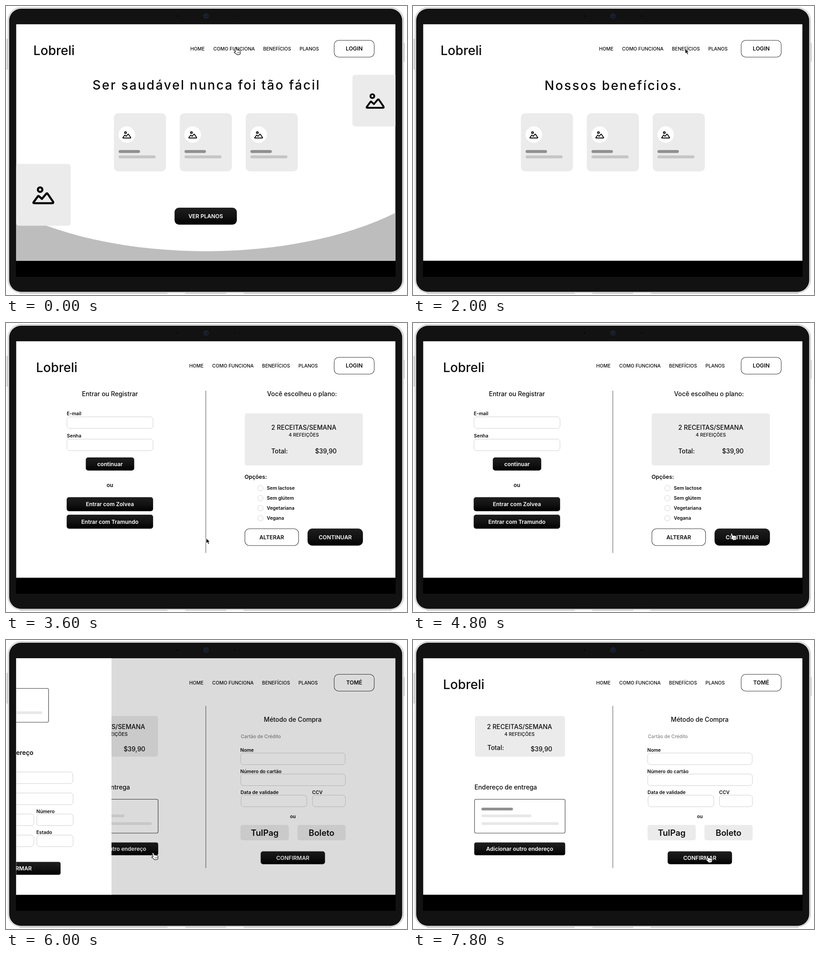
An HTML page that plays this animation: 881 by 636 pixels, repeating every 8000 ms.

```html
<!DOCTYPE html>
<html lang="pt">
<head>
<meta charset="utf-8">
<title>Protótipo</title>
<style>
html, body { margin: 0; width: 100%; height: 100%; overflow: hidden; background: #fff; }
svg { display: block; width: 100%; height: 100%; }
text { font-family: Inter, "Open Sans", sans-serif; font-optical-sizing: none; fill: #0c0c0c; white-space: pre; }
</style>
</head>
<body>
<svg id="stage" viewBox="0 0 881 636" xmlns="http://www.w3.org/2000/svg"></svg>
<script>
const LOOP = 8000, STEP = 200;
const PALE = '#ebebeb', DARK = '#909090', MID = '#c5c5c5';

const rect = (x, y, w, h, r, fill, extra = '') =>
  `<rect x="${x}" y="${y}" width="${w}" height="${h}" rx="${r}" fill="${fill}" ${extra}/>`;
const text = (x, y, s, size, weight = 500, anchor = 'start', extra = '') =>
  `<text x="${x}" y="${y}" font-size="${size}" font-weight="${weight}" text-anchor="${anchor}" ${extra}>${s}</text>`;
const mid = (x, y, s, size, weight = 500, extra) => text(x, y, s, size, weight, 'middle', extra);
const label = (x, y, s) => text(x, y, s, 10.4, 600);
const title = (y, s) => mid(440.5, y, s, 28, 500, 'letter-spacing="2.6"');
const bar = (x, y, w, h, fill) => rect(x, y, w, h, h / 2, fill);
const field = (x, y, w) => rect(x, y, w, 25.5, 6, 'none', 'stroke="#cfcfcf"');
const outline = (x, y, w, h, r) => rect(x, y, w, h, r, 'none', 'stroke="#3a3a3a" stroke-width="1.1"');
const button = (x, y, w, h, r, s, size = 12) =>
  rect(x, y, w, h, r, 'url(#ink)', 'stroke="#000" stroke-opacity=".3"') +
  mid(x + w / 2, y + h / 2 + 4.4, s, size, 600, 'style="fill:#fff"');
const divider = (y, h) => rect(438.5, y, 1, h, 0, '#4a4a4a');
const repeat = (n, make) => Array.from({ length: n }, (_, i) => make(i)).join('');

const icon = (x, y, k) => `<g transform="translate(${x} ${y}) scale(${k})" fill="none" stroke="#000"
  stroke-width="5.2" stroke-linejoin="round"><circle cx="-8" cy="-14" r="5.6"/>
  <path d="M-24 17 L-13.5 2.5 Q-12.3 1 -11 2.3 L-3.5 9 L7.5 -4 Q9 -5.6 10.5 -4 L24.2 16 Q26 19.8 22.5 19.8 H-22.5 Q-26 19.8 -24 17Z"/></g>`;

const miniCard = (x, y, k) => `<g transform="translate(${x} ${y}) scale(${k})">` +
  rect(0, 0, 114.5, 128, 9.5, PALE) + '<circle cx="28.4" cy="47" r="18.2" fill="#fff"/>' +
  icon(28.4, 47.6, 0.35) + bar(10.4, 81, 47, 6.6, DARK) + bar(10.4, 92.7, 81.3, 6.6, MID) + '</g>';
const miniRow = () => repeat(3, i => miniCard(237 + i * 144.8, 236, 1));

const header = (logoX, navX, user = 'LOGIN') =>
  text(logoX, 108, 'Lobreli', 28) +
  [['HOME', 0], ['COMO FUNCIONA', 50.5], ['BENEFÍCIOS', 160], ['PLANOS', 240]]
    .map(([s, dx]) => text(navX + dx, 98, s, 10.4)).join('') +
  outline(721, 75.5, 88, 37, 10) + mid(765, 98.4, user, 12, 600);

const summary = (cx, y) => mid(cx, y, '2 RECEITAS/SEMANA', 13.8) + mid(cx, y + 14.5, '4 REFEIÇÕES', 10.4);

const address = (x, y) => outline(x, y, 199, 74.5, 3.5) +
  bar(x + 15, y + 18.5, 69.5, 6, DARK) + bar(x + 15, y + 33.5, 110, 6, '#e8e8e8') +
  bar(x + 15, y + 50.5, 170, 6, '#e8e8e8');

const pages = {
  home: header(60, 405) +
    '<path d="M22 455 A570 266 0 0 0 856 455 V561 H22Z" fill="#bdbdbd"/>' +
    rect(22, 347.5, 120, 136, 6, PALE) + icon(82, 416.5, 0.88) +
    rect(761, 151.5, 110, 113.5, 6, PALE) + icon(811, 209, 0.76) +
    title(184, 'Ser saudável nunca foi tão fácil') + miniRow() +
    button(370.5, 444, 136.5, 37, 9.5, 'VER PLANOS'),

  how: header(60.4, 411.2) + title(186, 'Torne-se um chefe de primeira.') +
    repeat(3, i => rect(113.3 + i * 231, 237, 189.5, 184, 9, PALE) + icon(208 + i * 231, 330, 1)) +
    [117.5, 347, 580].map(x => bar(x, 436, 97.7, 13.6, DARK) + bar(x, 460.7, 169.7, 13.6, MID)).join(''),

  benefits: header(60.4, 408.8) + title(185, 'Nossos benefícios.') + miniRow(),

  plans: header(60.4, 406.1) + rect(12, 138, 122.5, 136, 6, PALE) + icon(74.5, 207.2, 0.88) +
    title(185, 'Conheça nossos planos.') +
    repeat(4, i => miniCard(122 + i * 167, 258.7, 1.157)) +
    button(370.5, 462, 136.5, 37, 9.5, 'CONFIRMAR'),

  sign: header(66, 402.6) + divider(149, 357) +
    mid(228.3, 161, 'Entrar ou Registrar', 13.8) +
    label(133.5, 203, 'E-mail') + field(134, 206.5, 189) +
    label(133.8, 252, 'Senha') + field(134, 255.5, 189) +
    button(175.5, 296, 106, 28.5, 5, 'continuar', 12.2) + mid(228.3, 361, 'ou', 12, 600) +
    button(133.5, 383.5, 189.5, 30.5, 5, 'Entrar com Zolvea') +
    button(133.5, 422, 189.5, 30.5, 5, 'Entrar com Tramundo') +
    mid(650.3, 161, 'Você escolheu o plano:', 13.8) +
    rect(524.5, 198.7, 259.5, 114.8, 5, PALE) + summary(654.3, 235) +
    text(582.7, 287, 'Total:', 13.8) + text(726.5, 287, '$39,90', 13.8, 500, 'end') +
    text(524, 343, 'Opções:', 12.2, 600) +
    ['Sem lactose', 'Sem glútem', 'Vegetariana', 'Vegana'].map((s, i) =>
      `<circle cx="559" cy="${363.5 + i * 22}" r="6" fill="none" stroke="#d0d0d0"/>` +
      label(573, 367.3 + i * 22, s)).join('') +
    outline(524.8, 452.8, 118, 37, 10) + mid(583.8, 475.7, 'ALTERAR', 12, 600) +
    button(662.7, 452.5, 121.3, 37.3, 10, 'CONTINUAR'),

  pay: header(66, 402.6, 'TOMÉ') + divider(145, 357) +
    rect(136, 167.3, 198, 89.5, 5, PALE) + summary(234, 196) +
    text(163.3, 242, 'Total:', 13.8) + text(306, 245, '$39,90', 13.8, 500, 'end') +
    text(135, 328.7, 'Endereço de entrega', 13.8) + address(135.2, 350.5) +
    button(134.7, 445.7, 199.5, 27.7, 4, 'Adicionar outro endereço') +
    mid(630, 179.5, 'Método de Compra', 13.8) +
    text(516, 215.7, 'Cartão de Crédito', 10.4, 500, 'start', 'style="fill:#858585"') +
    label(514.8, 246.2, 'Nome') + field(515.5, 248.7, 229.7) +
    label(514.8, 292.6, 'Número do cartão') + field(515.7, 295, 230) +
    label(515.3, 339, 'Data de validade') + field(516.5, 341.4, 144.3) +
    label(672.6, 339, 'CCV') + field(673.3, 341.4, 72.4) +
    mid(630.3, 392, 'ou', 10.4, 600) +
    rect(515.3, 407, 106, 33.8, 5, PALE) + mid(568.4, 430.5, 'TulPag', 18.4, 600) +
    rect(640.3, 407, 106, 33.8, 5, PALE) + mid(693.3, 430.5, 'Boleto', 18.4, 600) +
    button(559.7, 465.2, 141, 28, 5, 'CONFIRMAR')
};

const drawer = rect(22, 40, 419.5, 521, 0, '#fff') +
  text(102.4, 84, 'Endereços', 13.8, 600) + address(104.3, 106.5) +
  text(103, 253.3, 'Adicionar novo endereço', 13.8, 600) +
  label(102.6, 288.2, 'Nome') + field(103, 290.4, 253.7) +
  label(102.6, 334.4, 'Rua') + field(103.5, 336.7, 253.7) +
  label(103, 380.8, 'Bairro') + field(105.3, 383, 165.5) +
  label(276.5, 380.8, 'Número') + field(277.4, 383, 79.8) +
  label(103, 427, 'Cidade') + field(105.3, 429.3, 165.5) +
  label(276.5, 427, 'Estado') + field(277.4, 429.3, 79.8) +
  button(130, 488.4, 199.5, 28, 4, 'CONFIRMAR');

const screen = fill => rect(22.4, 40.2, 833.1, 520.4, 0, fill);

const device =
  rect(1, 72, 4, 68, 1.5, '#d6d6d6') + rect(872, 81, 4, 42, 1.5, '#d6d6d6') +
  [[30, 325], [394, 90], [522, 325]].map(([x, w]) => rect(x, 629, w, 4, 1, '#c9c9c9')).join('') +
  rect(4.5, 3.5, 869, 627.5, 28, '#e4e4e4', 'stroke="#b5b5b5"') +
  rect(7, 6, 863.5, 623, 26, '#121212') +
  '<circle cx="439.5" cy="22" r="6" fill="#1d2230"/><circle cx="439.5" cy="22" r="3" fill="#0b1020"/>' +
  '<circle cx="439" cy="21.5" r="1.2" fill="#2c4468"/>' +
  [377, 502].map(x => `<circle cx="${x}" cy="22" r="1.3" fill="#000"/>`).join('') +
  rect(22, 40, 834, 556, 0, '#000') + screen('#fff');

const pointers =
  '<path id="arrow" d="M0 0V10.8L2.7 8.5L4.7 12.8L6.7 11.9L4.8 7.8H8.3Z" fill="#000" stroke="#fff" stroke-width=".9"/>' +
  `<g id="hand" fill="#fff" stroke="#111" stroke-width="1.1" stroke-linejoin="round">
    <path d="M-1.6 .8C-2.2 -1.4 .8 -2 1.4 0L2.8 3.8C4 3 5.4 3.3 5.8 4.2C7 3.4 8.2 4 8.6 4.8C10 4.6 10.6 5.4 10.8 6.6L11 11L9.6 13.4L3.4 14.2L1 11.6L-2.6 9C-3.2 7.4 -1.4 6.8 .4 7.8Z"/>
    <path d="M4.4 8.6l.6 2.6M6.5 8.2l.6 2.6M8.5 7.9l.5 2.6" stroke-width=".8"/></g>`;

const stage = document.getElementById('stage');
stage.innerHTML =
  `<defs><linearGradient id="ink" x1="0" y1="0" x2="0" y2="1">
    <stop offset="0" stop-color="#1e1e1e"/><stop offset=".55" stop-color="#111"/><stop offset="1" stop-color="#000"/>
  </linearGradient><clipPath id="screen">${screen('#000')}</clipPath></defs>` +
  device + '<g clip-path="url(#screen)">' +
  Object.entries(pages).map(([id, body]) => `<g id="${id}">${body}</g>`).join('') +
  rect(22, 40, 834, 521, 0, '#000', 'id="shade"') + `<g id="drawer">${drawer}</g></g>` +
  `<g id="pointer">${pointers}</g>`;

const el = id => document.getElementById(id);
const show = (id, on) => el(id).setAttribute('display', on ? 'inline' : 'none');

// [start time, value] schedules
const pageTimes = [[0, 'home'], [1000, 'how'], [2000, 'benefits'], [2800, 'plans'], [3600, 'sign'], [5000, 'pay']];
const pointerTimes = [[0, 'hand'], [1000, 'arrow'], [1600, 'hand'], [2000, 'arrow'], [2400, 'hand'],
  [2800, 'arrow'], [3400, 'hand'], [3600, 'arrow'], [4800, 'hand'], [5000, 'arrow'], [5800, 'hand'],
  [6800, 'arrow'], [7800, 'hand']];
const path = [[0, 504, 93.2], [800, 504, 93.2], [1000, 506, 92.5], [1600, 596, 94], [2000, 598, 94],
  [2400, 663.5, 94], [3000, 663.5, 94], [3400, 440, 474], [4000, 440, 474], [4800, 700, 464],
  [5200, 700, 464], [5800, 323, 469.5], [6400, 323, 469.5], [6600, 290, 498], [6800, 290, 498],
  [7600, 646, 475.5], [7800, 646.5, 476]];

const current = (list, t) => list.filter(([start]) => start <= t).pop()[1];
const clamp = v => Math.max(0, Math.min(1, v));
const smooth = v => v * v * (3 - 2 * v);

function pointerAt(t) {
  const i = path.findIndex(key => key[0] > t);
  if (i < 0) return path[path.length - 1].slice(1);
  const a = path[i - 1], b = path[i];
  const p = smooth((t - a[0]) / (b[0] - a[0]));
  return [a[1] + (b[1] - a[1]) * p, a[2] + (b[2] - a[2]) * p];
}

function update(time) {
  const t = Math.floor((time % LOOP) / STEP) * STEP;
  const page = current(pageTimes, t), kind = current(pointerTimes, t);
  Object.keys(pages).forEach(id => show(id, id === page));
  ['arrow', 'hand'].forEach(id => show(id, id === kind));
  el('pointer').setAttribute('transform', `translate(${pointerAt(t).join(' ')})`);

  const open = smooth(clamp((t - 5800) / 400)) * (1 - smooth(clamp((t - 6600) / 400)));
  show('drawer', open > 0);
  el('drawer').setAttribute('transform', `translate(${-419.5 * (1 - open)} 0)`);
  el('shade').setAttribute('opacity', 0.28 * open);
}

const begin = performance.now();
function tick() {
  update(performance.now() - begin);
  requestAnimationFrame(tick);
}
tick();
</script>
</body>
</html>
```
